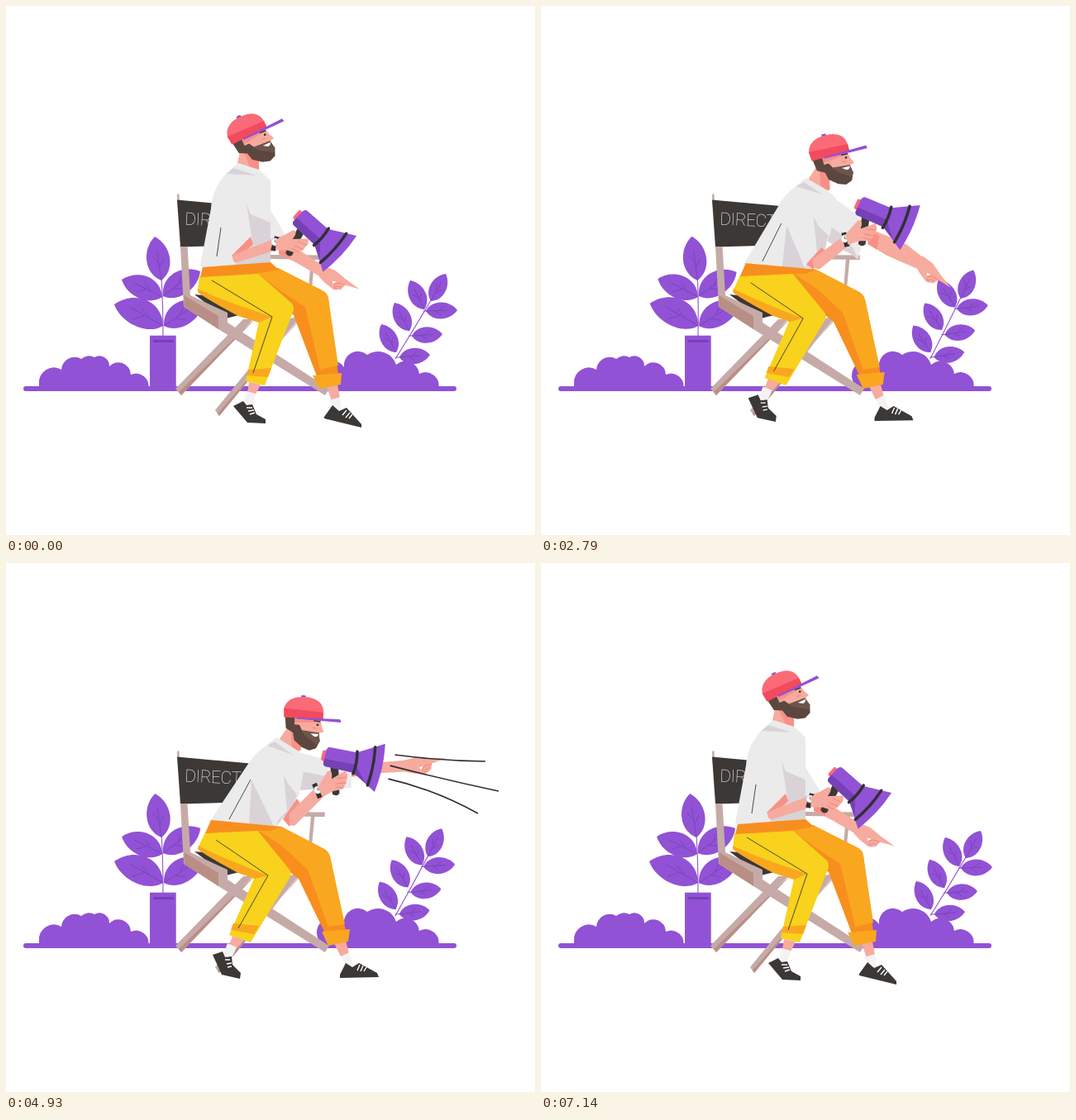
These frames come from a looping animation (640x640 px, 7210 ms). An HTML page:

```html
<!DOCTYPE html>
<html lang="en">
<head>
<meta charset="utf-8">
<title>Director</title>
<style>
  html, body { margin: 0; width: 100%; height: 100%; overflow: hidden; background: #fff; }
  svg { display: block; width: 100vw; height: 100vh; }
  .purple { fill: #9152d5; } .deep { fill: #7640b6; } .dark { fill: #3c3836; }
  .wood { fill: #c6aaa7; } .shade { fill: #b98f85; } .skin { fill: #f6ab9e; }
  .vein { fill: none; stroke: #7640b6; stroke-width: .8; }
  .stem { fill: none; stroke: #9152d5; stroke-width: 1.1; }
  .fold { fill: none; stroke: #f58a80; stroke-width: 1.2; }
  text { font: 200 21px Roboto, Lato, sans-serif; letter-spacing: -.4px; fill: #fff; }
</style>
</head>
<body>
<svg viewBox="0 0 640 640">
  <g class="purple">
    <path d="M40 463V457A18 18 0 0 1 67 440A16 16 0 0 1 91 427A14 14 0 0 1 107 425A12 12 0 0 1 125 436A15 15 0 0 1 151 446A15 15 0 0 1 172 463Z"/>
    <path d="M379 463V457A17.500 17.500 0 0 1 409 437A17 17 0 0 1 437 422A23 23 0 0 1 472 434A17 17 0 0 1 500 445A16 16 0 0 1 523 463Z"/>
    <rect x="21" y="460" width="524" height="6" rx="3"/>
  </g>
  <g id="tallPlant"></g>
  <g id="smallPlant"></g>
  <rect class="purple" x="174" y="398.7" width="31.7" height="62"/>
  <rect class="deep" x="178" y="404" width="25" height="3" rx="1"/>

  <path class="wood" d="M207 228L209.500 227L210 240L207.500 240ZM369 305L373.500 305L370 342L366 342ZM320 301L386 301.500L385.500 307L320 306Z"/>
  <path class="dark" d="M207 234.500L301 243L301 289L211 291.500Z"/>
  <text transform="translate(216 264.500) rotate(2.500)">DIRECTOR</text>
  <path class="wood" d="M344 378L357 375L258 496L253 489Z"/>
  <path class="shade" d="M355 380L357 376L258 496L256 493Z"/>
  <path class="wood" d="M287 379L299 379L212 471L205 463Z"/>
  <path class="shade" d="M296 383L300 380L212 471L209 467Z"/>
  <path class="wood" d="M257 381L268 383L391 463L386 471L257 391Z"/>
  <path class="dark" d="M228 349L262 352L286 373L266 378Z"/>
  <path class="wood" d="M211 291L219.500 291L223 350L268 371L268 388L257 391L215 364Z"/>
  <path class="shade" d="M215.500 350L257 375L257 391L215.500 364Z"/>

  <g id="farArm"></g>
  <g id="hand">
    <path class="skin" d="M-5 -7L10 -8L27 -3.500L46 0L28 3L26 10L18 14L5 11L-5 7Z"/>
    <path class="fold" d="M28 3L20 4L15 8M25 7L19 9M21 12L16 10"/>
    <path fill="#fff" d="M12 5L17 4L14 8Z"/>
  </g>
  <g id="body"></g>
  <g id="head">
    <path class="skin" d="M-3 -2L29 -1L31 8L34 15L29 16L29 21L8 21L-3 13Z"/>
    <path fill="#fa8f87" d="M-2 0L29 0L28 3L-2 6Z"/>
    <path fill="#5b473f" d="M-14 -2L-2 -2L-2 8L4 8L8 15L28 16L30 26L26 35L18 38L9 35L-1 27L-3 18L-12 13Z"/>
    <path fill="#6c554a" d="M6 14L28 16L30 26L27 31L12 21Z"/>
    <path fill="#fff" d="M18 17.500L28 17.500Q27 21.500 23 21Z"/>
    <path fill="none" stroke="#3c3836" stroke-width="1.600" d="M21 1.800L29 2.500"/>
    <circle class="dark" cx="26" cy="6.500" r="1.400"/>
    <path class="fold" d="M20 10L25 11"/>
    <rect class="purple" x="4" y="-28" width="5.500" height="3" rx="1"/>
    <path fill="#fb6a77" d="M-15 0L-16 -11Q-12 -26 8 -26Q30 -26 32 -10L32 -1Z"/>
    <path fill="#f24a5e" d="M-15 0L-16 -11L32 -9L32 -1Z"/>
    <path class="purple" d="M0 -.8L53 -2L54 1.800L0 1Z"/>
  </g>
  <g id="nearArm"></g>
  <g id="megaphone">
    <path class="dark" d="M8 11L18 11L26 41Q24 46 18 44Z"/>
    <rect x="-5" y="-6" width="8" height="13" rx="2.500" fill="#fb6a77"/>
    <path class="purple" d="M3 -11L36 -12L67 -29.500Q72 0 67 30L37 13L2 13Q-1 12 -1 9L-1 -7Q0 -11 3 -11Z"/>
    <path class="deep" d="M-1 4L37 3L54 22L37 13L2 13Q-1 12 -1 9Z"/>
    <path fill="none" stroke="#332f35" stroke-width="3.600" stroke-linecap="round" d="M36 -13Q39 0 37 14M56 -23Q60 0 57 24"/>
    <path class="skin" d="M-1 40L6 18Q12 14 13 26L27 12.500L31 18L31 27L29 35L18 40L7 50Z"/>
    <path class="fold" d="M30 20L19 24M31 27L20 30M29 33L20 35"/>
  </g>
  <g id="sound" fill="none" stroke="#302e2d" stroke-width="1.600">
    <path pathLength="1" d="M470 232Q523 239 580 240"/>
    <path pathLength="1" d="M464 245Q530 262 596 276"/>
    <path pathLength="1" d="M462 261Q519 274 571 303"/>
  </g>
</svg>
<script>
const LOOP = 7210, CYCLE = LOOP / 2;
const $ = id => document.getElementById(id);
const WHITE = '#ecebec', GREY = '#d9d3d8', YELLOW = '#f8d21c', AMBER = '#f9a71f', ORANGE = '#f88e1e',
  SKIN = '#f6ab9e', BLUSH = '#fa8f87', DARK = '#3c3836';

function draw(parent, attrs) {
  const path = document.createElementNS('http://www.w3.org/2000/svg', 'path');
  for (const name in attrs) path.setAttribute(name, attrs[name]);
  return parent.appendChild(path);
}

function leaf(plant, x, y, tipX, tipY, bend = 0) {
  const dx = tipX - x, dy = tipY - y;
  const at = (along, side) => `${x + dx * along - dy * side} ${y + dy * along + dx * side} `;
  draw(plant, { class: 'purple', d: `M${x} ${y}C${at(.2, .36 + bend)}${at(.75, .34 + bend)}${tipX} ${tipY}C${at(.75, bend - .34)}${at(.2, bend - .36)}${x} ${y}` });
  draw(plant, { class: 'vein', d: `M${x} ${y}L${at(.7, bend)}M${at(.3, bend / 2)}L${at(.48, .13)}M${at(.4, bend / 2)}L${at(.58, -.13)}` });
}

draw($('tallPlant'), { class: 'stem', d: 'M190 402Q190 360 188 330' });
[[188, 332, 180, 279], [189, 352, 140, 331, .04], [190, 351, 235, 321, -.04], [190, 387, 131, 361, .07], [191, 387, 239, 359, -.04]]
  .forEach(l => leaf($('tallPlant'), ...l));
draw($('smallPlant'), { class: 'stem', d: 'M471 427Q493 392 514 356M505 369H512M487 399H494M471 425H478' });
[[514, 357, 532, 324], [506, 367, 489, 332], [508, 369, 546, 368], [488, 393, 470, 359],
 [491, 399, 528, 397], [472, 419, 454, 385], [476, 425, 513, 422]]
  .forEach(l => leaf($('smallPlant'), ...l));

// Each morph: group, colour, upright, leaning, and for arms also lowered. "line:" marks strokes.
const morphs = [
  ['farArm', SKIN, 'M330 281L348 291L388 317L383 329L352 311L330 300Z', 'M385 241L430 243L491 238L491 252L455 254L385 260Z', 'M398 262L440 275L472 285L467 299L430 288L396 281Z'],
  ['farArm', BLUSH, 'M330 281L346 290L344 306L330 300Z', 'M400 244L425 244L425 258L400 260Z', 'M398 263L415 268L413 284L398 280Z'],
  ['farArm', WHITE, 'M314 240L320 247L337 275L336 278L320 283L314 280Z', 'M350 228L392 239L418 250L418 272L380 273L350 275Z', 'M350 228L388 250L402 264L394 297L372 288L348 280Z'],
  ['farArm', GREY, 'M320 282L336 277L337 279L320 284Z', 'M358 252L392 259L410 272L350 275Z', 'M354 263L378 275L392 296L348 282Z'],
  ['body', BLUSH, 'M284 174L306 178L306 198L295 198L280 191Z', 'M343 196L356 207L357 226L350 230L331 213Z'],
  ['body', SKIN, 'M283 176L288 178L296 196L280 191Z', 'M341 199L345 203L346 226L331 213Z'],
  ['body', WHITE, 'M281 190L306 198L320 211L320 250L320 311L238 318L235 314L248 245Q249 222 267 202Z', 'M327 211L353 227L363 236L355 280L326 321L248 315L247 312L293 243Q301 230 316 220Z'],
  ['body', GREY, 'M291 240L296 252L320 262L320 311L278 316L277 309L298 285Z', 'M336 257L342 268L352 280L347 295L326 319L330 310L340 300Z'],
  ['body', GREY, 'M298 285L278 316L292 314Z', 'M297 262L294 317L325 320Z'],
  ['body', GREY, 'M267 203L275 196L303 205Z', 'M316 221L325 216L347 232Z'],
  ['body', 'line:#3c3836', 'M260 268L255 303', 'M296 262L270 310'],

  ['legs', SKIN, 'M388 460L401 458L404 474L394 478Z', 'M397 460L411 457L415 472L405 476Z'],
  ['legs', '#f4f3f4', 'M391 477L404 473L406 488L398 491Z', 'M406 476L415 471L421 487L411 490Z'],
  ['legs', DARK, 'M385 497L395 483L403 490L412 486L430 506L430 510L385 499Z', 'M404 498L411 484L419 489L427 484L449 496L451 501L404 502Z'],
  ['legs', 'line:#fff', 'M407 495L412 489M411 498L416 492M415 499L419 494', 'M425 493L428 486M429 494L432 487M433 494L436 489'],
  ['legs', ORANGE, 'M280 326L329 317L384 345Q389 348 390 354L402 446L376 448L348 374Z', 'M280 326L333 319L385 346Q390 349 392 355L411 445L386 448L354 382Z'],
  ['legs', AMBER, 'M303 322L329 317L384 345Q389 348 390 354L402 435L380 440L362 364L330 343Z', 'M303 322L333 319L385 346Q390 349 392 355L410 437L390 440L365 371L335 343Z'],
  ['legs', AMBER, 'M371 447L406 444L405 458L379 463Z', 'M382 446L416 443L414 458L390 463Z'],
  ['legs', SKIN, 'M294 455L308 458L302 470L292 468Z', 'M275 449L288 456L279 466L270 462Z'],
  ['legs', '#f4f3f4', 'M291 466L302 469L298 484L287 483Z', 'M268 460L279 465L273 478L262 476Z'],
  ['legs', DARK, 'M275 484L287 478L291 483L298 482L303 494L314 500L314 505L292 504Z', 'M250 474L262 470L265 477L273 476L274 486L284 496L283 503L261 498Z'],
  ['legs', 'line:#fff', 'M291 486L298 486M293 490L300 489M295 494L301 492', 'M265 480L271 480M267 485L273 484M268 489L273 488'],
  ['legs', YELLOW, 'M234 327L303 322L346 360Q350 366 346 373L313 459L290 454L306 382L281 374Q238 352 232 345Z', 'M241 326L303 322L343 371Q346 376 343 381L296 459L270 450L300 382L281 374Q238 352 232 345Z'],
  ['legs', AMBER, 'M232 342Q255 354 322 376L306 383L281 375Q238 352 232 346Z', 'M233 342Q255 354 317 378L301 382L281 375Q238 352 232 346Z'],
  ['legs', AMBER, 'M293 440L321 438L317 449L291 447Z', 'M275 436L306 439L300 449L272 444Z'],
  ['legs', 'line:#3c3836', 'M249 332L322 376L299 444', 'M254 335L317 378L281 442'],
  ['legs', ORANGE, 'M238 316L320 310L330 319L303 324L235 328Z', 'M248 311L334 319L320 324L303 324L241 327Z'],

  ['nearArm', BLUSH, 'M273 302L296 279L299 288L278 308Z', 'M335 310L352 285L358 294L343 319Z', 'M326 312L344 290L350 298L334 319Z'],
  ['nearArm', SKIN, 'M275 301L326 281L331 294L280 310Q272 310 275 301Z', 'M343 303L374 272L384 283L350 317Q341 322 343 303Z', 'M334 305L367 278L376 288L342 318Q332 320 334 305Z'],
  ['nearArm', 'strap:#332f33', 'M328 279L323 296', 'M373 267L380 284', 'M369 272L374 289']
].map(([group, paint, ...poses]) => {
  const [kind, colour] = paint.includes(':') ? paint.split(':') : ['', paint];
  const attrs = kind
    ? { fill: 'none', stroke: colour, 'stroke-width': kind === 'strap' ? 6 : colour === '#fff' ? 1.4 : .9 }
    : { fill: colour };
  return { group, text: poses[0], poses: poses.map(p => p.match(/\d+/g).map(Number)),
    el: draw($(group === 'legs' ? 'body' : group), attrs) };
});
const watch = draw($('nearArm'), { fill: '#fff', stroke: '#cfc9cd', 'stroke-width': .6, d: 'M-4.500 0A4.500 4.500 0 1 1 4.500 0A4.500 4.500 0 1 1 -4.500 0' });
const watchHands = draw($('nearArm'), { fill: 'none', stroke: DARK, 'stroke-width': .7, d: 'M0 -3V0H2' });

const clamp = v => Math.min(1, Math.max(0, v));
const span = (t, from, to) => clamp((t - from) / (to - from));
const smooth = k => k * k * (3 - 2 * k);
const cubic = k => k < .5 ? 4 * k ** 3 : 1 - 4 * (1 - k) ** 3;
const lerp = (a, b, k) => a + (b - a) * k;
const blend = ([up, lean, low = lean], k, drop) => up.map((v, i) => lerp(v, lerp(lean[i], low[i], drop), k));
const place = (el, [x, y, angle = 0]) => el.setAttribute('transform', `translate(${x} ${y}) rotate(${angle})`);

function render(time) {
  const sway = turns => (1 - Math.cos(time / LOOP * turns * 2 * Math.PI)) / 2;
  $('tallPlant').setAttribute('transform', `rotate(${5 * sway(3)} 190 399)`);
  $('smallPlant').setAttribute('transform', `rotate(${-4.8 * sway(4)} 472 430)`);

  const t = time % CYCLE;
  const back = 1 - cubic(span(t, 2690, 3230));
  const lean = cubic(span(t, 95, 620)) * back;
  const reach = cubic(span(t, 80, 600)) * back;
  const drift = 2.2 * smooth(span(t, 1700, 2600));
  const drop = 1.4 * smooth(span(t, 1500, 2450));
  const torso = lean * (1 - .055 * drift);
  const tilt = smooth(span(t, 170, 800)) * back * (1 - .28 * drift);
  const progress = { body: torso, legs: lean, farArm: reach, nearArm: reach };

  for (const { group, text, poses, el } of morphs) {
    const points = blend(poses, progress[group], drop);
    let i = 0;
    el.setAttribute('d', text.replace(/\d+/g, () => points[i++].toFixed(2)));
  }
  place($('head'), [lerp(287, 351.5, torso), lerp(161, 187.5, torso), lerp(-25.6, 4, tilt)]);
  place($('megaphone'), blend([[355, 254, 43], [387, 233, 12.6], [386.5, 238, 20.5]], reach, drop));
  place($('hand'), blend([[386, 323, 25], [487, 245, -11], [470, 292, 26]], reach, drop));
  const wrist = blend([[325.5, 285.5], [377, 274.5], [371, 279.5]], reach, drop);
  place(watch, wrist);
  place(watchHands, wrist);

  // Three bursts: each line grows outward, then empties from its near end.
  const burst = (t - 620) / 470, beat = burst % 1;
  $('sound').style.display = burst > 0 && burst < 3 ? '' : 'none';
  const tail = span(beat, .5, 1), length = span(beat, 0, .48) - tail;
  $('sound').setAttribute('stroke-dasharray', `0 ${tail} ${Math.max(0, length)} 2`);
}

const start = performance.now();
function tick() {
  render((performance.now() - start) % LOOP);
  requestAnimationFrame(tick);
}
tick();
</script>
</body>
</html>
```
